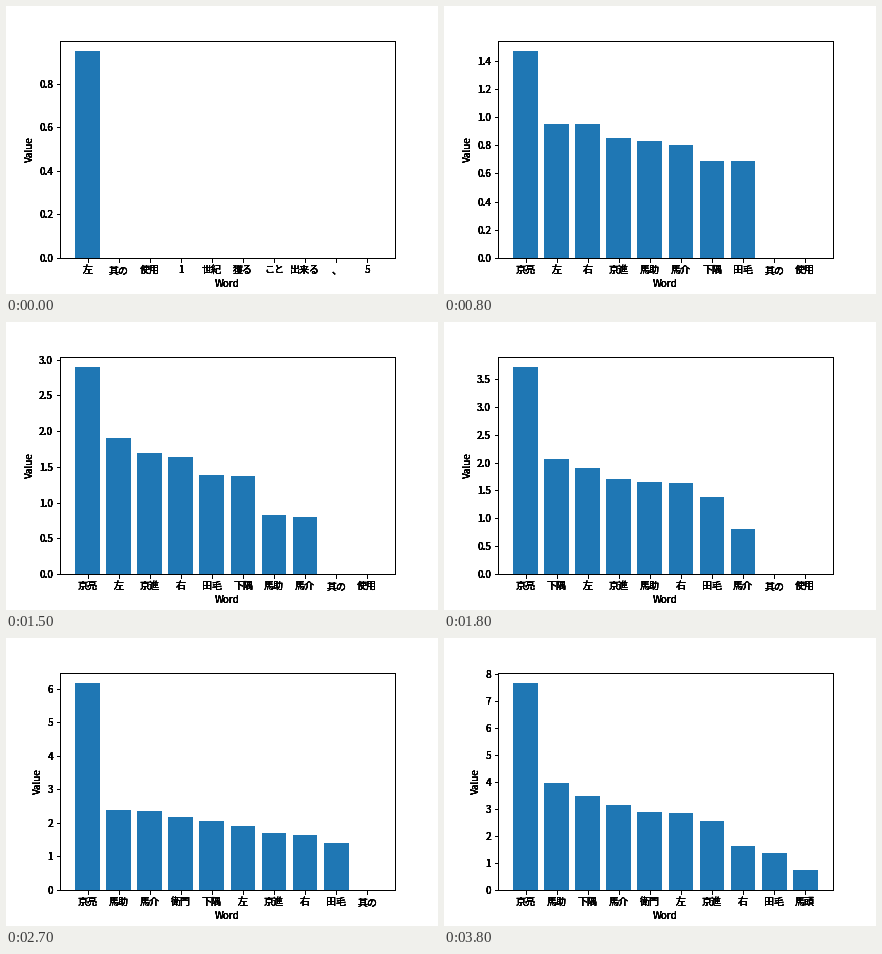
Write a matplotlib script that moves like this. It is 432 px wide and 288 px high and loops after 3.9 s.

```python
import matplotlib.pyplot as plt
from matplotlib.animation import FuncAnimation
from matplotlib.axes import Axes

plt.rcParams.update({
    "font.family": "Noto Sans CJK JP",
    "font.size": 10,
    "axes.linewidth": 1,
    "xtick.major.width": 1,
    "ytick.major.width": 1,
})

TOP = 10
FILLERS = ["其の", "使用", "1", "世紀", "獲る", "こと", "出来る", "、", "5"]

# One word gains a score at each step.
GAINS = [
    ("左", .95), ("京亮", .82), ("右", .95), ("京亮", .65), ("下隅", .692),
    ("京進", .85), ("馬助", .83), ("馬介", .80), ("田毛", .690),
    ("京亮", .82), ("左", .95), ("京進", .85), ("右", .69),
    ("京亮", .61), ("田毛", .698), ("下隅", .686),
    ("京亮", .82), ("馬助", .83), ("下隅", .69),
    ("京亮", .82), ("衛門", .72), ("馬介", .80),
    ("京亮", .82), ("馬助", .74), ("衛門", .725),
    ("京亮", .82), ("馬介", .76), ("衛門", .725),
    ("馬頭", .74), ("馬助", .785), ("下隅", .70),
    ("京亮", .75), ("左", .95), ("京進", .85), ("馬介", .79),
    ("衛門", .72), ("馬助", .785), ("京亮", .74), ("下隅", .71),
]


class InkedAxes(Axes):
    """Axes drawn several times over, so soft text edges turn solid."""

    def draw(self, renderer):
        for _ in range(6):
            super().draw(renderer)


def ranking(step):
    totals = dict.fromkeys(FILLERS, 0)
    for word, gain in GAINS[:step + 1]:
        totals[word] = totals.get(word, 0) + gain
    return sorted(totals.items(), key=lambda item: -item[1])[:TOP]


fig = plt.figure(figsize=(6, 4), dpi=72, facecolor="white")
ax = fig.add_axes(InkedAxes(fig, [0.125, 0.125, 0.775, 0.755],
                            facecolor="none"))
bars = ax.bar(range(TOP), [1] * TOP, color="#1f77b4")
ax.set_xlim(-0.89, 9.89)
ax.set_xticks(range(TOP))
ax.set_xlabel("Word")
ax.set_ylabel("Value")


def update(step):
    words, values = zip(*ranking(step))
    for bar, value in zip(bars, values):
        bar.set_height(value)
        bar.set_visible(value > 0)
    ax.set_ylim(0, values[0] * 1.05)
    ax.set_xticklabels(words)
    return bars


anim = FuncAnimation(fig, update, frames=len(GAINS), interval=100,
                     repeat=True, repeat_delay=0, blit=False)
plt.show()
```
